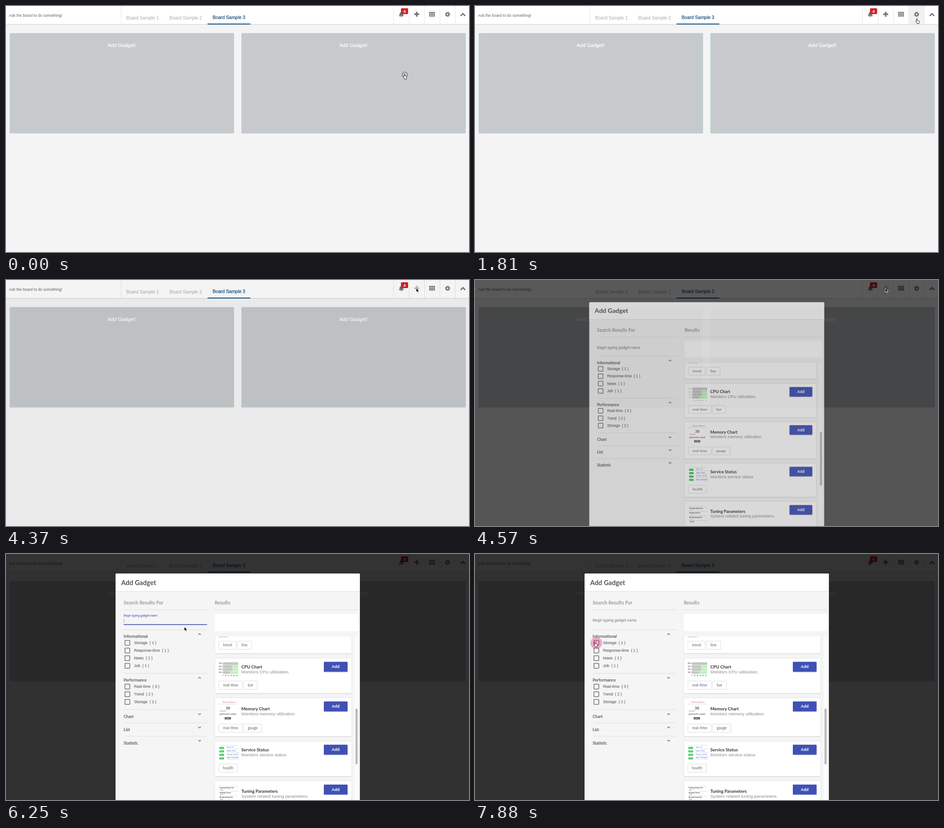
These frames come from a looping animation (1027 by 546 pixels, 8 s). An HTML page:

```html
<!DOCTYPE html>
<html lang="en">
<head>
<meta charset="utf-8">
<title>Add Gadget</title>
<style>
html, body { margin: 0; width: 100%; height: 100%; overflow: hidden; background: #f4f4f4; }
svg { display: block; width: 1027px; height: 546px; }
text { font-family: "Liberation Sans", Arial, sans-serif; white-space: pre; }
.lato { font-family: Lato, sans-serif; }
.bold { font-weight: 700; }
.medium { stroke: currentColor; stroke-width: .22px; }
</style>
</head>
<body>
<svg id="stage" viewBox="0 0 1027 546" xmlns="http://www.w3.org/2000/svg"></svg>
<script>
const LOOP = 8000;

// Markup helpers
const text = (x, y, size, str, fill, cls = '', extra = '') =>
  `<text x="${x}" y="${y}" font-size="${size}" fill="${fill}" color="${fill}" class="${cls}" ${extra}>${str}</text>`;
const rect = (x, y, w, h, fill, extra = '') =>
  `<rect x="${x}" y="${y}" width="${w}" height="${h}" fill="${fill}" ${extra}/>`;
const path = (d, extra) => `<path d="${d}" ${extra}/>`;
const rule = (x, y, w) => rect(x, y - .5, w, 1, '#dedede');
const middle = 'text-anchor="middle"';
const times = (n, fn) => Array.from({ length: n }, (_, i) => fn(i)).join('');

// Dashboard behind the dialog
const gadget = x =>
  rect(x + .5, 60.5, 497, 222, '#c7cacd', 'stroke="#b5d6d7" rx="1.5"') +
  text(x + 217.5, 90.5, 11.04, 'Add Gadget!', '#fff', 'medium');

const icons = () => {
  const grey = '#757575';
  return path('M871 22.5q2-1.5 2-4.5 0-4 4-4.5 4 .5 4 4.5 0 3 2 4.5ZM875.4 23.3h3.2a1.6 1.6 0 0 1-3.2 0Z', `fill="${grey}"`) +
    rect(876, 5, 16, 13, '#d2232a', 'rx="2"') +
    text(884, 14.8, 9, '4', '#fff', 'bold', middle) +
    path('M905.5 18.3h11M911 12.8v11', `id="plus" stroke="${grey}" stroke-width="3.4"`) +
    times(9, i => rect(938.6 + i % 3 * 4.5, 13 + Math.floor(i / 3) * 3.7, 3.8, 3, grey, 'rx=".5"')) +
    `<g fill="none" stroke="${grey}"><circle cx="979.5" cy="18.5" r="3.2" stroke-width="2.6"/>
     <circle cx="979.5" cy="18.5" r="4.9" stroke-width="1.6" stroke-dasharray="1.924"/></g>` +
    path('M1008.5 22l5-5 5 5', `fill="none" stroke="${grey}" stroke-width="2.8"`);
};

const page = () =>
  rect(0, 0, 1027, 546, '#f4f4f4') +
  rect(0, 0, 1027, 40, '#fff') +
  rect(0, 40, 1027, 1.2, '#d9d9d9') + rect(0, 41.2, 1027, 1, '#ececec') +
  rect(0, 0, 33, 40, '#f1f1f1', 'id="hover"') +
  [255, 859, 894, 928, 962, 996].map(x => rect(x, 0, 1, 40, '#e6e6e6')).join('') +
  text(6.5, 23.6, 8.56, 'Ask the board to do something!', '#666') +
  text(267, 29.6, 10.05, 'Board Sample 1', '#aaa') +
  text(362.5, 29.6, 10.05, 'Board Sample 2', '#aaa') +
  text(458.3, 29, 10.1, 'Board Sample 3', '#0f4a7d', 'medium') +
  rect(447, 39, 95, 2, '#0f5286') +
  icons() + gadget(8) + gadget(522);

// Left column of the dialog
const chevron = (y, up) =>
  path(up ? `M426.7 ${y + 1.4}l2.8-2.8 2.8 2.8` : `M426.7 ${y - 1.4}l2.8 2.8 2.8-2.8`,
    'fill="none" stroke="#555" stroke-width="1.3"');

const section = (y, name, up) =>
  rule(261, y, 185) + text(261, y + 18.2, 9.1, name, '#555', 'lato medium') + chevron(y + 10, up);

const check = (y, name, count) =>
  rect(263.8, y - 5.2, 10.8, 10.8, 'none', 'stroke="#5a5a5a" stroke-width="1.3" rx=".8"') +
  text(284, y + 3.1, 8.5, `${name}\u00a0\u00a0( ${count} )`, '#707070', 'medium');

const filters = () =>
  text(261, 112, 10.8, 'Search Results For', '#999', 'lato bold') + rule(261, 124, 185) +
  text(261, 151, 8.56, 'Begin typing gadget name', '#777', '', 'id="label"') +
  rect(261, 155.8, 185, 1.6, '#3445ab', 'id="underline"') +
  rect(261, 144, .9, 9, '#888', 'id="caret"') +
  section(168, 'Informational', true) +
  check(197, 'Storage', 1) + check(214, 'Response-time', 1) + check(231, 'News', 1) + check(248, 'Job', 1) +
  section(265, 'Performance', true) +
  check(294, 'Real-time', 3) + check(311, 'Trend', 2) + check(328, 'Storage', 2) +
  section(345.3, 'Chart') + section(374.8, 'List') + section(404.3, 'Statistic');

// Card thumbnails
const cpuThumb = () => [34, 20, 21, 16].map((w, i) => {
  const y = 240.5 + i * 6.5;
  return text(472, y + 3.8, 2.6, `CPU ${i}`, '#444', 'bold') +
    rect(481, y, 34, 5.7, '#bdf3bd') + rect(481, y, w, 5.7, '#c6c6c6');
}).join('') + times(6, i => text(481 + i * 6.2, 271, 2.6, i * 10, '#444', 'bold', middle));

const memoryThumb = () =>
  text(495, 330.3, 3.5, 'Memory Utilization', '#b0505c', '', middle) + rule(472, 333, 43) +
  text(492.3, 345, 9.2, '38', '#333', '', middle) + rect(474, 348, 14, .9, '#d9607a') +
  text(492.3, 357, 6.5, 'percent used', '#444', 'lato', middle) +
  rect(485, 362, 14, 5.2, '#666', 'rx=".6"') + text(492, 365.7, 2.8, '■ Max', '#fff', '', middle);

const serviceThumb = () => ['Drives : 5/5', 'Backup : Online', 'Processes : Idle OK', 'Merge : Running/OK'].map((s, i) => {
  const y = 428 + i * 7.75;
  return rect(473.5, y, 10, 4.6, '#22bf45', 'rx=".8"') + text(478.5, y + 3.2, 2.6, 'Good', '#fff', 'bold', middle) +
    text(490, y + 2.2, 2.8, s, '#2e55b8') + text(490, y + 5, 2.3, 'This is a normal state note', '#7d97d0');
}).join('') + rule(472, 424.5, 43);

const tuningThumb = () =>
  text(474, 513, 3, '-', '#555') + rule(472, 516, 43) +
  ['Exchange Storage Time', 'Exchange Timeout', 'Message Storage Size'].map((s, i) =>
    text(474, 520.4 + i * 10.3, 2.8, s, '#333', 'bold') + text(475, 525 + i * 10.3, 2.6, '1000', '#555') +
    rule(474, 526.6 + i * 10.3, 41)).join('') +
  rect(474, 548, 11, 4, '#ccc');

// Right column of the dialog
const tags = (y, list) => {
  let x = 472;
  return list.map(([name, w]) => {
    const out = rect(x, y, w, 18.4, '#fff', 'stroke="#dcdcdc" rx="1.5"') +
      text(x + w / 2, y + 12, 8.5, name, '#666', 'lato', middle);
    x += w + 2.5;
    return out;
  }).join('');
};

const card = (y, h, titleY, title, note, labels, thumb) =>
  rect(463, y + 1, 304, h, '#d2d2d2', 'rx="2"') +
  rect(463, y, 304, h, '#fff', 'stroke="#dedede" stroke-width=".8" rx="2"') + thumb +
  text(522, titleY, 9.75, title, '#333', 'lato bold') +
  text(522, titleY + 11, 9.77, note, '#8a8a8a') +
  rect(705, y + 9.2, 52.7, 22.4, '#b9bcd0', 'rx="1.5"') +
  rect(705, y + 8.2, 52.7, 22, '#3f51b5', 'rx="1.5"') +
  text(731.3, y + 22.3, 9, 'Add', '#fff', 'bold', middle) + tags(y + h - 27.6, labels);

const results = () =>
  text(463, 112, 10.8, 'Results', '#999', 'lato bold') + rule(463, 124, 318) +
  rect(463, 133, 318, 38, '#fff') +
  rect(773, 183, 8, 363, '#fbfbfb') + rect(775.2, 343, 4.8, 124, '#bcbcbc', 'rx="2.2"') +
  '<clipPath id="list"><path d="M455 183h320v390h-320z"/></clipPath><g clip-path="url(#list)">' +
  card(143, 78, 160, '', '', [['trend', 38.5], ['line', 32]], text(472, 184.6, 4, '2014 01 02', '#666')) +
  card(231, 78.5, 253.7, 'CPU Chart', 'Monitors CPU utilization.', [['real-time', 52.5], ['bar', 30.5]], cpuThumb()) +
  card(319, 86, 346.6, 'Memory Chart', 'Monitors memory utilization', [['real-time', 52.5], ['gauge', 40.5]], memoryThumb()) +
  card(415, 78.5, 438.3, 'Service Status', 'Monitors service status', [['health', 41.5]], serviceThumb()) +
  card(503.5, 90, 529.8, 'Tuning Parameters', 'System related tuning parameters.', [], tuningThumb()) + '</g>';

const dialog = () =>
  rect(243, 43.5, 542, 560, '#f5f5f5', 'rx="1.5"') + rect(243, 43.5, 542, 39.5, '#fff', 'rx="1.5"') +
  rule(243, 83, 542) + text(255.5, 68.5, 14.65, 'Add Gadget', '#555', 'lato bold') +
  filters() + results();

const stage = document.getElementById('stage');
stage.innerHTML = page() + rect(0, 0, 1027, 546, '#000', 'id="dim"') +
  `<g id="dialog">${dialog()}<circle id="ripple" cx="269" cy="197.5" fill="#e91e78" fill-opacity=".35"/></g>
  <g id="pointer">
    <circle id="ring" cx="1" cy="1.5" r="6" fill="none" stroke="#333" stroke-width=".9"/>
    <path id="hand" d="M-.8 1a1 1 0 0 1 2 0v3.2l3.4.8q1.2.4 1 1.8l-.7 2.6v1.7H.4V9.6L-2.4 6.8q-.6-1.2.7-1.2l.9.8Z"
      fill="#fff" stroke="#111" stroke-width=".9" stroke-linejoin="round"/>
    <path id="arrow" d="M0 0v9.2l2.1-1.9 1.5 3.3 1.6-.7-1.4-3.1h2.8Z" fill="#000" stroke="#fff" stroke-width=".8"/>
  </g>`;
const el = Object.fromEntries([...stage.querySelectorAll('[id]')].map(e => [e.id, e]));

// Moments when the picture updates: [first, last, steps]
const beats = [
  [0], [90], [320, 410, 2], [680, 1020, 5], [1290, 2080, 10], [2170], [2520, 3310, 10], [3390], [4020],
  [4200, 4370, 3], [4570], [4810], [5050], [5310], [5490], [5630, 5890, 4], [6250, 6510, 4],
  [6780, 7400, 8], [7580, 7880, 4]
].flatMap(([a, b = a, n = 1]) => Array.from({ length: n },
  (_, i) => Math.floor((a + (b - a) * i / Math.max(1, n - 1)) / 10) * 10));

// Keyframe tracks: [time, values...]
const tracks = {
  pointer: [
    [0, 883.5, 151], [90, 883, 148], [230, 883, 148], [410, 898, 104], [600, 898, 104], [1020, 968, 48],
    [1200, 968, 48], [1810, 980, 28], [2080, 981, 23], [2170, 981.5, 22], [2430, 981.5, 22], [3310, 910, 18],
    [3390, 912, 18], [4110, 912, 18], [4200, 910, 17.7], [4810, 910, 17.7], [5050, 888, 18], [5310, 675, 78],
    [5490, 659, 83], [5890, 399, 161], [6250, 395.5, 161.5], [6510, 317, 175], [6690, 317, 175], [7400, 266, 195]
  ],
  dim: [[4110, 0], [4370, .045], [4570, .65], [4810, .8]],
  fade: [[4370, 0], [4570, .78], [4810, 1]],
  scale: [[4570, .9613], [4810, 1]],
  float: [[4810, 0], [5050, .3], [5310, 1], [7480, 1], [7880, .08]],
  underline: [[4810, 0], [5310, 1], [7480, 1], [7880, 0]],
  ripple: [[7480, 0], [7880, 13]]
};

function at(name, t) {
  const keys = tracks[name];
  const i = keys.findIndex(k => k[0] > t);
  if (i <= 0) return keys.at(i).slice(1);
  const [a, b] = [keys[i - 1], keys[i]];
  const p = (t - a[0]) / (b[0] - a[0]);
  return a.slice(1).map((v, j) => v + (b[j + 1] - v) * p);
}

const set = (e, attrs) => { for (const k in attrs) e.setAttribute(k, attrs[k]); };
const show = (e, on) => set(e, { visibility: on ? 'visible' : 'hidden' });

function draw(time) {
  const t = beats.findLast(b => b <= time);
  const value = name => at(name, t)[0];

  const [x, y] = at('pointer', t);
  const hand = t < 4200 || (t > 6510 && x < 276);
  set(el.pointer, { transform: `translate(${x} ${y})` });
  show(el.ring, t < 90);
  show(el.hand, hand);
  show(el.arrow, !hand);

  show(el.hover, t < 4200 && y < 40 && x > 859);
  set(el.hover, { x: 860 + Math.floor((x - 860) / 34.3) * 34.3 });
  set(el.plus, { opacity: t >= 4020 && t < 5050 ? .5 : 1 });

  const s = value('scale');
  set(el.dim, { opacity: value('dim') });
  set(el.dialog, {
    opacity: value('fade'),
    transform: `translate(${514 * (1 - s)} ${197 * (1 - s)}) scale(${s})`
  });

  const f = value('float'), u = value('underline');
  const focused = t >= 5050 && t < 7580;
  set(el.label, { y: 151 - 12.5 * f, 'font-size': 8.56 - 2.1 * f, fill: focused ? '#3445ab' : '#777' });
  set(el.underline, { x: 353.5 - 92.5 * u, width: 185 * u });
  show(el.caret, t >= 5490 && focused && Math.floor((t - 5250) / 500) % 2 === 0);
  set(el.ripple, { r: value('ripple') });
}

function tick() {
  draw(performance.now() % LOOP);
  requestAnimationFrame(tick);
}
tick();
</script>
</body>
</html>
```
